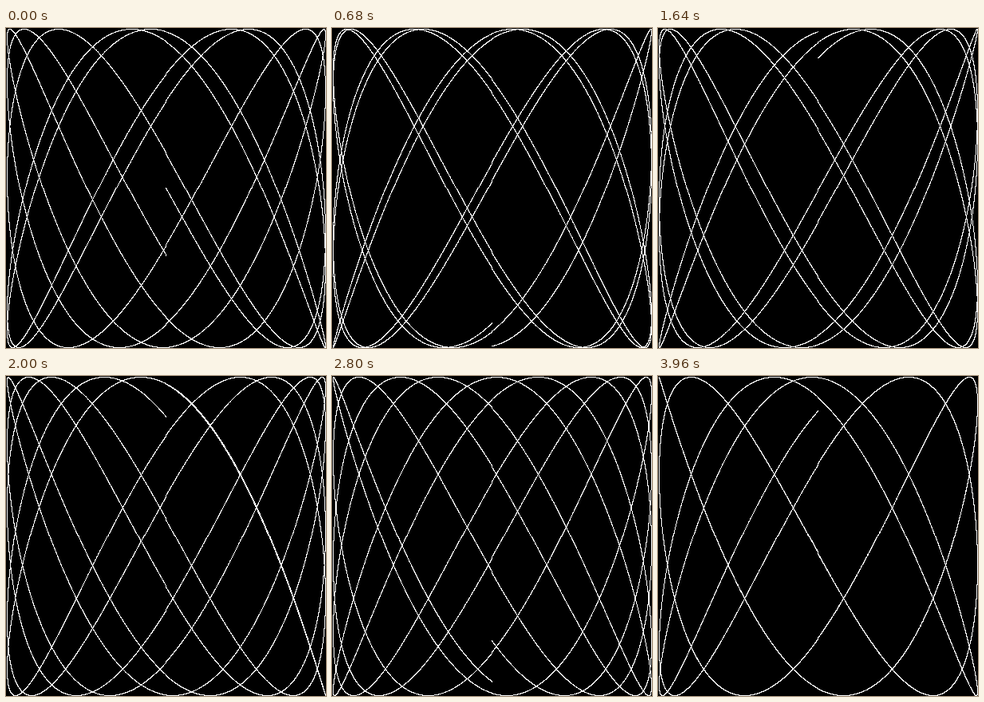
An HTML page with a canvas that plays this animation: 401 px wide and 401 px high, repeating every 4 s.

```html
<!DOCTYPE html>
<html lang="en">
<head>
<meta charset="utf-8">
<title>Lissajous</title>
<style>
  html, body { margin: 0; width: 100%; height: 100%; overflow: hidden; background: #000; }
  canvas { display: block; width: 401px; height: 401px; image-rendering: pixelated; }
</style>
</head>
<body>
<canvas id="stage" width="401" height="401"></canvas>
<script>
const CYCLES = 5;
const STEP = 0.001;
const FREQ = 0.6046602879796196 * 3;
const RADIUS = 200;
const SIDE = 2 * RADIUS + 1;
const STEPS = 100;
const STEP_MS = 40;
const PHASE_STEP = 0.1;

const ctx = document.getElementById('stage').getContext('2d');
const image = ctx.createImageData(SIDE, SIDE);
const pixels = new Uint32Array(image.data.buffer);
const BLACK = 0xff000000;
const WHITE = 0xffffffff;

// Truncation toward zero gives the small kinks along the centre lines.
const toPixel = v => RADIUS + Math.trunc(v * RADIUS + 0.5);

function draw(phase) {
  pixels.fill(BLACK);
  for (let t = 0; t < CYCLES * 2 * Math.PI; t += STEP) {
    const x = toPixel(Math.sin(t));
    const y = toPixel(Math.sin(t * FREQ + phase));
    pixels[y * SIDE + x] = WHITE;
  }
  ctx.putImageData(image, 0, 0);
}

const start = performance.now();
let shown = -1;

function tick() {
  const step = Math.floor((performance.now() - start) / STEP_MS) % STEPS;
  if (step !== shown) {
    draw(step * PHASE_STEP);
    shown = step;
  }
  requestAnimationFrame(tick);
}
tick();
</script>
</body>
</html>
```
